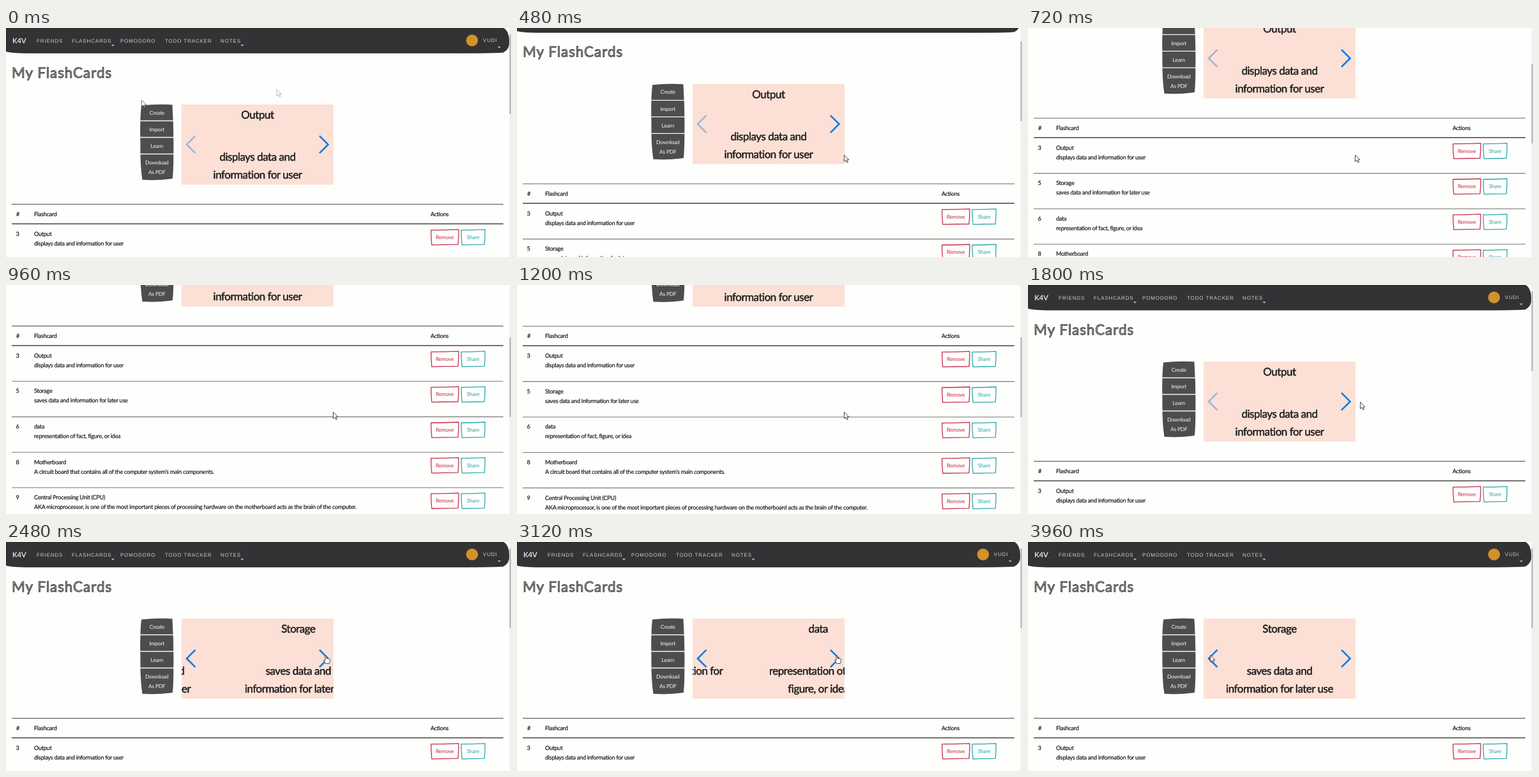
These frames come from a looping animation (791x359 px, 4 s). An HTML page:

```html
<!DOCTYPE html>
<html lang="en">
<head>
<meta charset="utf-8">
<title>Flashcards</title>
<style>
html, body { margin: 0; width: 100%; height: 100%; overflow: hidden; background: #fefefd; }
svg { display: block; }
text { font-family: Lato, sans-serif; font-size: 9.1px; letter-spacing: -.028em; fill: #1c1c1c; stroke: #1c1c1c; stroke-width: .22px; text-rendering: geometricPrecision; }
.mid { text-anchor: middle; }
.big { font-size: 17px; stroke-width: .5px; }
.title { font-size: 22.5px; letter-spacing: .95px; fill: url(#hatch); stroke: #2a2a2a; stroke-width: .8px; }
.nav { font-family: "Liberation Sans", Arial, sans-serif; font-size: 8px; letter-spacing: .87px; fill: #cfcecf; stroke: none; }
.brand { font-size: 11.3px; letter-spacing: 0; fill: #eee; stroke: #eee; }
.btn { font-size: 8.5px; stroke: none; }
.light { fill: #f5f5f5; }
.chev { fill: none; stroke: #0b7ae0; stroke-width: 2.6; }
.ptr { fill: #fff; stroke: #333; stroke-width: .9; stroke-linejoin: round; }
</style>
</head>
<body>
<svg id="stage" width="791" height="359" viewBox="0 0 791 359">
  <defs>
    <pattern id="hatch" width="2" height="2" patternUnits="userSpaceOnUse" patternTransform="rotate(35)">
      <rect width="2" height="2" fill="#fefefd"/><rect width="2" height="1" fill="#333"/>
    </pattern>
    <path id="arrow" d="M0 0V10.5L2.5 8.3L4.3 12L6 11.2L4.3 7.6H7.4Z"/>
  </defs>
  <rect width="791" height="359" fill="#fefefd"/>
  <g id="page">
    <path d="M0 0H779Q787 4 788 20Q789 33 779 38Q765 39.4 700 39.2H30Q6 38.800 0 36.500Z" fill="#343234" stroke="#222" stroke-width=".8"/>
    <g id="nav"></g>
    <circle cx="730" cy="19.5" r="9.3" fill="#d2922a"/>
    <text class="title" x="9" y="77.5">My FlashCards</text>
    <path d="M212 121.500Q236 118.500 260.500 120.300Q263 160 262.300 196Q262.500 220 261 236Q240 239.500 213.500 238Q210 215 210.500 180Q209.500 145 212 121.500Z" fill="#4e4c4e"/>
    <path d="M209 145.500H263M209 171.500H263M209 197.500H263" stroke="#f4f4f4" stroke-width="1.3"/>
    <g id="menu"></g>
    <svg x="275" y="119.800" width="238" height="126">
      <rect width="238" height="126" fill="#fce0d6"/>
      <g id="deck"></g>
    </svg>
    <path id="prev" class="chev" d="M296.500 169.200L283 182.700L296.500 196.200"/>
    <path class="chev" d="M491 169.200L504.500 182.700L491 196.200"/>
    <g id="table"></g>
  </g>
  <rect x="788.500" width="2.500" height="359" fill="#f1f1f1"/>
  <rect id="thumb" x="788.500" width="2.500" height="125" fill="#bcbcbc"/>
  <use id="ghost" href="#arrow" class="ptr" x="424" y="96" opacity=".4"/>
  <g id="cursor" class="ptr">
    <use id="point" href="#arrow"/>
    <path id="hand" d="M0 1Q1 -.5 2 1V4.500Q3.300 3.500 4 5Q5.300 4 6 5.500Q7.500 5 7.500 6.500V9.500L6.300 12.500H1L-2.300 7.800Q-2 6 0 8Z"/>
  </g>
</svg>
<script>
const $ = id => document.getElementById(id);
const text = (x, y, s, cls = '') => `<text x="${x}" y="${y}" class="${cls}">${s}</text>`;
const line = (y, w, c) => `<path d="M9 ${y}H779" stroke="${c}" stroke-width="${w}"/>`;

const links = [[48, 'FRIENDS'], [103, 'FLASHCARDS'], [179, 'POMODORO'], [249, 'TODO TRACKER'], [336, 'NOTES'], [747, 'VUDI']];
$('nav').innerHTML = text(10, 23.5, 'K4V', 'brand')
  + links.map(([x, s]) => text(x, x > 700 ? 22 : 22.7, s, 'nav')).join('')
  + [[167.5, 26], [370, 26], [772.5, 29]].map(([x, y]) => `<path d="M${x - 2.6} ${y}h5.2l-2.6 2.8z" fill="#7fd0cf"/>`).join('');

$('menu').innerHTML = [[135.5, 'Create'], [161.7, 'Import'], [187.8, 'Learn'], [214, 'Download'], [229, 'As PDF']]
  .map(([y, s]) => text(236.3, y, s, 'btn mid light')).join('');

const cards = [
  ['Output', 'displays data and', 'information for user'],
  ['Storage', 'saves data and', 'information for later use'],
  ['Process', 'turns it to information for', 'user'],
  ['data', 'representation of fact,', 'figure, or idea']
];
$('deck').innerHTML = cards.map((c, i) =>
  c.map((s, k) => text(119 + i * 238, [22.5, 88.3, 116.5][k], s, 'big mid')).join('')).join('');

// Hand-drawn outline button with its label
function button(x, y, w, label, color) {
  const d = `M${x} ${y + 1}Q${x + w / 2} ${y + .8} ${x + w} ${y}Q${x + w + .2} ${y + 12} ${x + w - 1} ${y + 23.6}`
    + `Q${x + w / 2} ${y + 23.6} ${x + 1.2} ${y + 24.3}Q${x} ${y + 12} ${x} ${y + 1}Z`;
  return `<path d="${d}" fill="none" stroke="${color}" stroke-width="1.3" stroke-linejoin="round"/>
    <text class="btn mid" x="${x + w / 2}" y="${y + 15}" style="fill:${color}">${label}</text>`;
}

const rows = [
  [3, 'Output', 'displays data and information for user'],
  [5, 'Storage', 'saves data and information for later use'],
  [6, 'data', 'representation of fact, figure, or idea'],
  [8, 'Motherboard', "A circuit board that contains all of the computer system's main components."],
  [9, 'Central Processing Unit (CPU)', 'AKA microprocessor, is one of the most important pieces of processing hardware on the motherboard acts as the brain of the computer.']
];
$('table').innerHTML = line(276.4, 1.1, '#666') + line(307, 1.5, '#444')
  + text(16, 294.7, '#') + text(44, 294.7, 'Flashcard') + text(665, 294.7, 'Actions')
  + rows.map(([id, name, info], i) => {
    const y = 307 + i * 55.6;
    return text(15.5, y + 18.8, id) + text(44, y + 18.8, name) + text(44, y + 33.8, info)
      + button(665.7, y + 8.8, 43.3, 'Remove', '#c62f4b') + button(713, y + 8.8, 37.3, 'Share', '#2aa9ae')
      + line(y + 56, 1.1, '#777');
  }).join('');

const clamp = v => Math.min(1, Math.max(0, v));

// CSS "ease" curve
function ease(x) {
  x = clamp(x);
  let lo = 0, hi = 1, u = x;
  for (let i = 0; i < 18; i++) {
    u = (lo + hi) / 2;
    const v = 1 - u;
    if (.75 * v * v * u + .75 * v * u * u + u ** 3 < x) lo = u; else hi = u;
  }
  return .3 * (1 - u) ** 2 * u + 3 * (1 - u) * u * u + u ** 3;
}

// Interpolates keys of the form [time, ...values]
function track(keys, t, shape = v => v) {
  let i = 0;
  while (i < keys.length - 2 && t >= keys[i + 1][0]) i++;
  const [a, b] = [keys[i], keys[i + 1]];
  const p = shape(clamp((t - a[0]) / (b[0] - a[0])));
  return a.slice(1).map((v, k) => v + (b[k + 1] - v) * p);
}

const smooth = v => v * v * (3 - 2 * v);
const scrollKeys = [[400, 0], [480, 31.7], [900, 212], [1200, 212], [1440, 124.4], [1660, 0]];
const mouseKeys = [[40, 424, 96], [420, 512.5, 199], [1500, 512.5, 199], [1780, 520.5, 183.5], [1900, 520.5, 183.5],
  [2200, 500, 178], [3260, 500, 178], [3460, 285.5, 177.5]];
const clicks = [[2350, 1], [2680, 1], [3003, 1], [3480, -1], [3660, -1]];

function draw(t) {
  const [y] = track(scrollKeys, t);
  $('page').setAttribute('transform', `translate(0 ${-y})`);
  $('thumb').setAttribute('y', 10 + y * .34);

  const pos = clicks.reduce((s, [at, dir]) => s + dir * ease((t - at) / 300), 0);
  $('deck').setAttribute('transform', `translate(${-238 * pos} 0)`);
  $('prev').setAttribute('opacity', t < clicks[0][0] ? .4 : 1);

  const first = t < 40;
  const [mx, my] = first ? [212.5, 113] : track(mouseKeys, t, smooth);
  const hand = t > 2120 && t < 3290;
  $('cursor').setAttribute('transform', `translate(${mx} ${my})`);
  $('cursor').setAttribute('opacity', first ? .75 : 1);
  $('ghost').style.display = first ? '' : 'none';
  $('hand').style.display = hand ? '' : 'none';
  $('point').style.display = hand ? 'none' : '';
}

const start = performance.now();
function tick() {
  draw((performance.now() - start) % 4000);
  requestAnimationFrame(tick);
}
draw(0);
requestAnimationFrame(tick);
</script>
</body>
</html>
```
